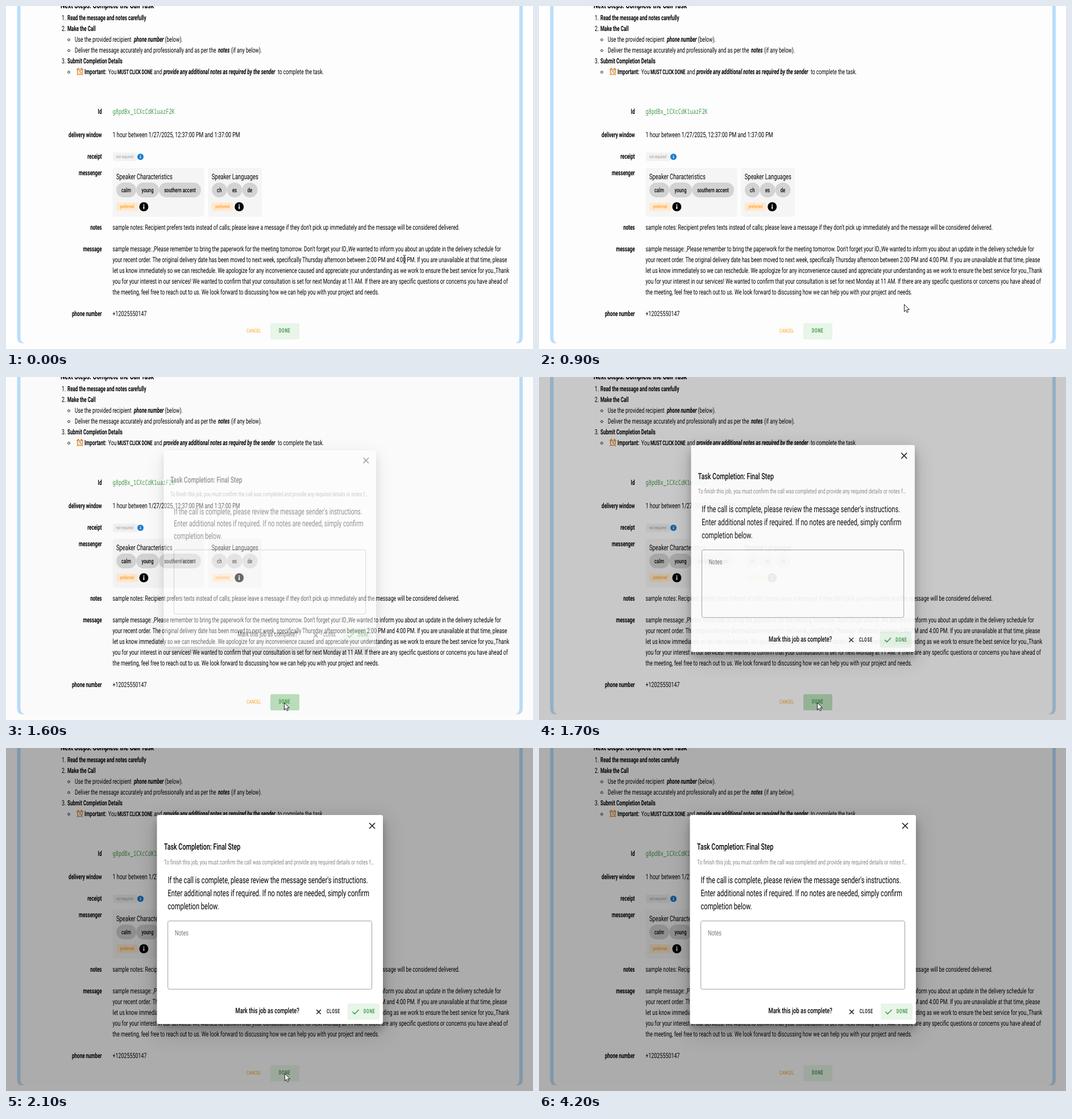
These frames come from a looping animation (927x604 px, 4.9 s). An HTML page:

```html
<!DOCTYPE html>
<html lang="en">
<head>
<meta charset="utf-8">
<title>Call task</title>
<style>
html, body { margin: 0; width: 100%; height: 100%; overflow: hidden; background: #fff; }
svg { display: block; width: 927px; height: 604px; }
text { font-family: Roboto, "Open Sans", sans-serif; text-rendering: geometricPrecision; white-space: pre; }
.mono { font-family: "Noto Sans Mono", "DejaVu Sans Mono", monospace; }
#panel { filter: drop-shadow(0 9px 7px rgba(0,0,0,.22)) drop-shadow(0 10px 18px rgba(0,0,0,.22)); }
</style>
</head>
<body>
<svg id="stage" viewBox="0 0 927 604"></svg>
<script>
const LOOP = 4900, STEP = 100;
const INK = '#000', GREEN = '#43994a', MINT = '#e8f5e9';

// One condensed look for all type; bold is set slightly tighter.
function text(x, y, str, o = {}) {
  const { size = 12.53, weight = 400, fill = INK, anchor = 'start', italic, space = 0, cls = '' } = o;
  const squeeze = weight >= 700 ? 0.646 : 0.7;
  return `<text class="${cls}" transform="translate(${x} ${y}) scale(${squeeze} 1)" font-size="${size}"
    font-weight="${weight}" fill="${fill}" text-anchor="${anchor}" letter-spacing="${space}"
    font-style="${italic ? 'italic' : 'normal'}">${str}</text>`;
}
const bold = (x, y, str, o) => text(x, y, str, { weight: 700, ...o });
const slant = (x, y, str) => bold(x, y, str, { italic: true, size: 12.9 });
const plain = (x, y, str) => text(x, y, str, { size: 12.35 });
const label = (y, str) => bold(168.5, y, str, { anchor: 'end' });
const caps = (x, y, str, fill) => bold(x, y, str, { size: 10.5, space: 1, fill });

const box = (x, y, w, h, fill, r = 3, extra = '') =>
  `<rect x="${x}" y="${y}" width="${w}" height="${h}" rx="${r}" fill="${fill}" ${extra}/>`;
const line = (d, color, width) =>
  `<path d="${d}" fill="none" stroke="${color}" stroke-width="${width}"/>`;
const cross = (x, y, r, width) =>
  line(`M${x - r} ${y - r}l${2 * r} ${2 * r}m0 ${-2 * r}l${-2 * r} ${2 * r}`, '#222', width);
const bullet = y => `<circle cx="110.5" cy="${y}" r="1.9" fill="none" stroke="${INK}" stroke-width=".9"/>`;

function info(x, y, r, fill) {
  const u = r / 8;
  return `<circle cx="${x}" cy="${y}" r="${r}" fill="${fill}"/>` +
    box(x - u, y - 4 * u, 2 * u, 2 * u, '#fff', 0) + box(x - u, y - u, 2 * u, 5 * u, '#fff', 0);
}

const chip = ([x, w, str]) => box(x, 311, w, 26, '#d3d3d3', 13) +
  text(x + w / 2, 328, str, { size: 11, weight: 500, anchor: 'middle' });

function speaker(x, w, title, chips) {
  return box(x, 285, w, 86, '#f5f5f5', 4) +
    text(x + 6.3, 304.5, title, { size: 13.4 }) + chips.map(chip).join('') +
    box(x + 6.3, 346, 38, 15, '#ffe9d0') +
    text(x + 25.3, 355.5, 'preferred', { size: 8.7, weight: 500, fill: '#fca326', anchor: 'middle' }) +
    info(x + 54.7, 353.5, 8, '#000');
}

const clock = `<g fill="none" stroke="#e5862f" stroke-linecap="round">
  <path d="M125 112l2.6-2.2M135 112l-2.6-2.2" stroke-width="2"/>
  <path d="M126.4 120l-1.3 1.6M133.6 120l1.3 1.6" stroke-width="1.3"/>
  <circle cx="130" cy="116" r="4.5" fill="#fff4e0" stroke-width="1.5"/>
  <path d="M130 113.4V116.2l2 1" stroke="#555" stroke-width=".9"/></g>`;

const edge = 'M19.500 -2V584Q19.500 594 29.500 594H33Q25.500 592 25.500 584V-2Z';

const message = [
  "sample message: ,Please remember to bring the paperwork for the meeting tomorrow. Don't forget your ID.,We wanted to inform you about an update in the delivery schedule for",
  'your recent order. The original delivery date has been moved to next week, specifically Thursday afternoon between 2:00 PM and 4:00 PM. If you are unavailable at that time, please',
  'let us know immediately so we can reschedule. We apologize for any inconvenience caused and appreciate your understanding as we work to ensure the best service for you.,Thank',
  'you for your interest in our services! We wanted to confirm that your consultation is set for next Monday at 11 AM. If there are any specific questions or concerns you have ahead of',
  'the meeting, feel free to reach out to us. We look forward to discussing how we can help you with your project and needs.'
];

const page = box(0, 0, 927, 604, '#fff', 0) + box(23, -10, 883, 604, '#fdfdfd', 8) +
  `<path d="${edge}" fill="#bbdefb"/><path d="${edge}" fill="#bbdefb" transform="translate(928.5 0) scale(-1 1)"/>` +
  bold(96, 3.5, 'Next Steps: Complete the Call Task', { size: 16.1 }) +
  text(98, 25, '1.') + bold(108, 25, 'Read the message and notes carefully') +
  text(98, 44, '2.') + bold(108, 44, 'Make the Call') +
  bullet(59.5) + plain(121, 63, 'Use the provided recipient') + slant(225, 63, 'phone number') + plain(279.5, 63, '(below).') +
  bullet(78.5) + plain(121, 82, 'Deliver the message accurately and professionally and as per the') +
  slant(373, 82, 'notes') + plain(396, 82, '(if any below).') +
  text(98, 101, '3.') + bold(108, 101, 'Submit Completion Details') +
  bullet(116.5) + clock + bold(138, 120, 'Important:') + plain(179.8, 120, 'You') +
  bold(196, 120, 'MUST CLICK DONE', { size: 11.3, space: -0.15 }) + plain(260, 120, 'and') +
  slant(277, 120, 'provide any additional notes as required by the sender') +
  plain(478, 120, 'to complete the task.') +
  label(190, 'Id') + text(187.5, 190, 'g8pdBx_1CXcCdK1uazF2K', { size: 12.4, weight: 500, fill: GREEN, cls: 'mono' }) +
  label(230.5, 'delivery window') + text(187.5, 230.5, '1 hour between 1/27/2025, 12:37:00 PM and 1:37:00 PM', { size: 12.75 }) +
  label(269, 'receipt') + box(188, 258, 43, 15, '#f2f2f2') +
  text(194, 267.5, 'not required', { size: 8, fill: '#999' }) + info(236.5, 265.5, 5.5, '#1c7ed0') +
  label(297.5, 'messenger') +
  speaker(187.7, 161, 'Speaker Characteristics', [[194, 35, 'calm'], [229, 40, 'young'], [269, 74, 'southern accent']]) +
  speaker(355.5, 94.5, 'Speaker Languages', [[362, 26.5, 'ch'], [388.5, 27, 'es'], [415.5, 27, 'de']]) +
  label(393.5, 'notes') +
  text(187.5, 393.5, "sample notes: Recipient prefers texts instead of calls; please leave a message if they don't pick up immediately and the message will be considered delivered.") +
  label(431.5, 'message') + message.map((str, i) => text(187.5, 431.5 + i * 19.1, str)).join('') +
  label(546, 'phone number') + text(187.5, 546, '+12025550147', { space: 0.1 }) +
  text(423, 575.3, 'CANCEL', { size: 9.2, weight: 500, fill: '#f8b544', space: 0.3 }) +
  box(465, 558.5, 51, 28.5, MINT, 2.5, 'id="button"') + caps(480, 575.3, 'DONE', GREEN);

const panel = box(265.5, 118, 397.5, 368, '#fff', 3, 'id="panel"') + cross(644, 137, 5, 1.7) +
  text(278, 178.7, 'Task Completion: Final Step', { size: 15.4, weight: 500 }) +
  text(278, 204.5, 'To finish this job, you must confirm the call was completed and provide any required details or notes f…', { size: 11.58, fill: '#858585' }) +
  ["If the call is complete, please review the message sender's instructions.",
   'Enter additional notes if required. If no notes are needed, simply confirm',
   'completion below.'].map((str, i) => text(284.5, 237.7 + i * 23.1, str, { size: 15.9 })).join('') +
  box(284.7, 304.5, 358.8, 120.3, 'none', 3, 'stroke="#9e9e9e"') +
  text(297, 330, 'Notes', { size: 12.9, fill: '#777' }) +
  text(403.5, 467.2, 'Mark this job as complete?', { size: 13.3, weight: 500 }) +
  cross(550, 464.7, 3.8, 1.5) + caps(564, 467.2, 'CLOSE', '#222') +
  box(601, 450, 56, 28.5, MINT, 2.5) + line('M609.500 464.500l3.800 3.800l7.400-7.600', GREEN, 1.6) +
  caps(629, 467.2, 'DONE', GREEN);

const stage = document.getElementById('stage');
stage.innerHTML = page + box(0, 0, 927, 604, '#000', 0, 'id="shade"') +
  `<g id="dialog">${panel}</g>
  <g id="beam">${line('M-2.500-7Q0-7 0-5.500Q0-7 2.500-7M0-5.500V5.500M-2.500 7Q0 7 0 5.500Q0 7 2.500 7', '#222', 1)}</g>
  <path id="arrow" d="M.5.5V13.200L3.400 10.500L5.300 14.800L7.400 13.900L5.500 9.700H9.500Z" fill="#fff" stroke="#111" stroke-width=".95"/>`;
const el = id => document.getElementById(id);
const [button, shade, dialog, beam, arrow] = ['button', 'shade', 'dialog', 'beam', 'arrow'].map(el);

// Start time, then values held until the next entry.
const pointer = [
  [0, 701, 446], [400, 695, 455], [500, 680, 478], [600, 656, 508], [700, 643, 523],
  [900, 642, 525], [1000, 627, 532], [1100, 590, 549], [1200, 535, 568], [1300, 498, 576],
  [1400, 480, 577], [1500, 489, 573], [2100, 490, 573], [3300, 491.5, 573], [3400, 492, 573],
  [4000, 499, 580], [4100, 520, 595], [4200, 520, 640]
];
// time, scale, dialog opacity, shade opacity, button colour
const opening = [
  [0, 0.9, 0, 0, MINT], [1500, 0.9, 0, 0, '#c4e4c6'], [1600, 0.94, 0.41, 0.012, '#bbdfbc'],
  [1700, 0.99, 0.92, 0.21, '#bde2be'], [1800, 1, 1, 0.31, '#d3ead4'], [1900, 1, 1, 0.32, MINT]
];
const held = (track, t) => track.findLast(key => key[0] <= t);

function draw(time) {
  const t = Math.floor(time % LOOP / STEP) * STEP;
  const [, x, y] = held(pointer, t);
  const [, scale, alpha, dim, fill] = held(opening, t);
  const onText = t < 600;
  beam.setAttribute('visibility', onText ? 'visible' : 'hidden');
  arrow.setAttribute('visibility', onText ? 'hidden' : 'visible');
  (onText ? beam : arrow).setAttribute('transform', `translate(${x} ${y})`);
  button.setAttribute('fill', fill);
  shade.setAttribute('opacity', dim);
  dialog.setAttribute('opacity', alpha);
  dialog.setAttribute('transform', `translate(464.25 302) scale(${scale}) translate(-464.25 -302)`);
}

let start;
function tick(now) {
  start ??= now;
  draw(now - start);
  requestAnimationFrame(tick);
}
draw(0);
requestAnimationFrame(tick);
</script>
</body>
</html>
```
